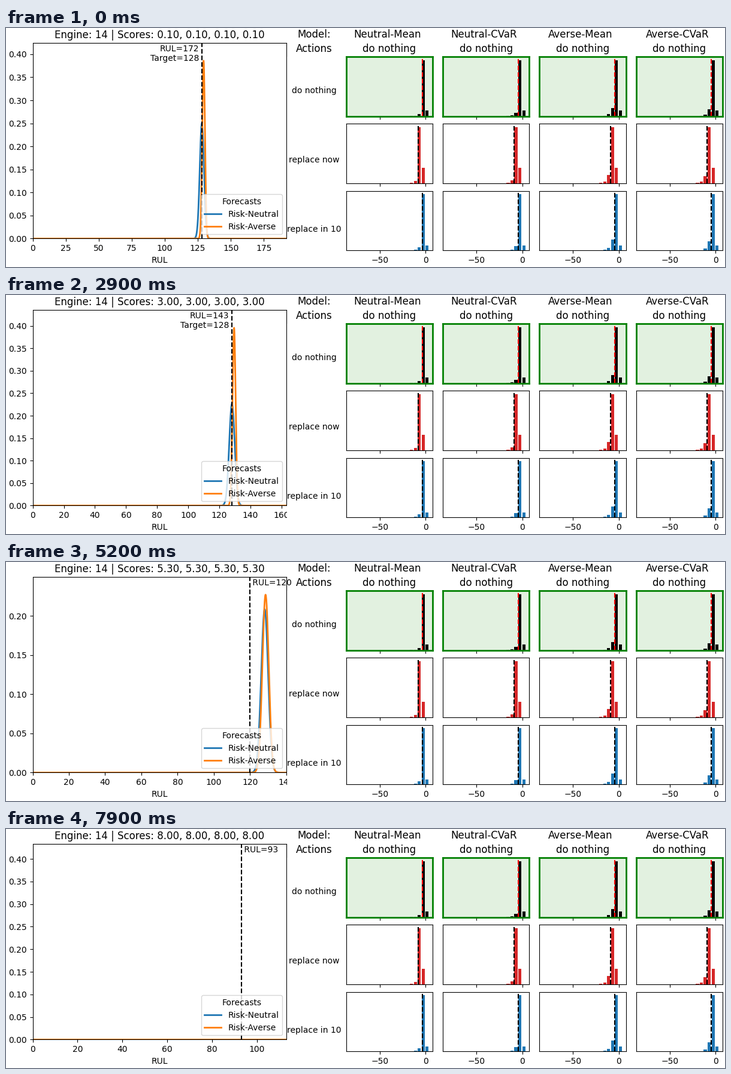
These frames come from a looping animation (1200x400 px, 8000 ms). A matplotlib script:

```python
import numpy as np
import matplotlib.pyplot as plt
from matplotlib.animation import FuncAnimation

W, H, DPI = 1200, 400, 100
FRAMES, INTERVAL = 80, 100
START_RUL, MAX_TARGET = 172, 128

plt.rcParams.update({"font.family": "DejaVu Sans", "font.size": 10})
fig = plt.figure(figsize=(W / DPI, H / DPI), dpi=DPI, facecolor="white")


def add_axes(left, top, right, bottom):
    """Add axes placed in pixels, measured from the top left corner."""
    return fig.add_axes([left / W, 1 - bottom / H,
                         (right - left) / W, (bottom - top) / H])


def heading(x, text, line):
    """Centre a heading on the first (0) or second (1) line above the panels."""
    fig.text(x / W, 1 - (16.5 + 23.5 * line) / H, text, fontsize=12,
             ha="center", va="baseline")


# Forecast panel
LEFT, RIGHT = 44.6, 467.7
main = add_axes(LEFT, 24.9, RIGHT, 352.4)
xs = np.linspace(0, 200, 2001)
neutral, = main.plot(xs, 0 * xs, color="tab:blue", lw=2, label="Risk-Neutral")
averse, = main.plot(xs, 0 * xs, color="tab:orange", lw=2, label="Risk-Averse")
target_line = main.axvline(MAX_TARGET, color="black", ls="--")
note = main.text(0, 0, "", va="top")
main.set_xlabel("RUL")
main.legend(title="Forecasts", loc="lower right")
title = main.set_title("")

# Histogram grid geometry, in pixels
GRID_LEFT, GRID_TOP = 567.7, 48
COL_PITCH, ROW_PITCH = 161.3, 112.4
PANEL_W, PANEL_H = 144.4, 99.6
ZERO = 132.5   # cost zero, from the panel's left edge
PX = 1.53      # pixels per unit of cost
STEP = 6.55    # bin width

# name, bar color, line color, height right of the mode, bins shifted, tail scale
ACTIONS = [
    ("do nothing", "black", "red", 10, 0, 1),
    ("replace now", "tab:red", "black", 26, 1, 1),
    ("replace in 10", "tab:blue", "black", 8.5, 0, 1.3),
]
# name, height left of the mode, pixels from zero to the expected cost
MODELS = [
    ("Neutral-Mean", 4, 5.6),
    ("Neutral-CVaR", 5.5, 7),
    ("Averse-Mean", 14, 7),
    ("Averse-CVaR", 12, 7.5),
]

names = add_axes(469, GRID_TOP, 559.5, H)
names.set(xlim=(469, 559.5), ylim=(H, GRID_TOP), xticks=[], yticks=[])
names.spines[:].set_visible(False)
heading(514.6, "Model:", 0)
heading(514.6, "Actions", 1)


def draw_histogram(left, top, action, model):
    _, color, line_color, head, shift, scale = action
    _, tail, expected = model
    ax = add_axes(left, top, left + PANEL_W, top + PANEL_H)
    heights = np.array([head, 94, *(scale * tail * 0.24 ** np.arange(3))])
    starts = -STEP * (np.arange(len(heights)) + shift) / PX
    ax.bar(starts, heights, width=0.8 * STEP / PX, align="edge", color=color)
    ax.axvline(-(expected + STEP * shift) / PX, color=line_color, ls="--")
    ax.set(xlim=(-ZERO / PX, (PANEL_W - ZERO) / PX), ylim=(0, PANEL_H),
           xticks=[-50, 0], yticks=[])
    return ax


for row, action in enumerate(ACTIONS):
    names.text(514.6, 104.6 + 116 * row, action[0],
               ha="center", va="center", clip_on=True)
    for col, model in enumerate(MODELS):
        left = GRID_LEFT + COL_PITCH * col
        ax = draw_histogram(left, GRID_TOP + ROW_PITCH * row, action, model)
        ax.tick_params(labelbottom=row == 2)
        if row == 0:
            # The chosen action
            ax.set_facecolor("#e2f1e0")
            ax.spines[:].set(color="green", linewidth=2)
            heading(left + PANEL_W / 2 - 3.5, model[0], 0)
            heading(left + PANEL_W / 2, action[0], 1)

# Step and peak density of the risk-averse forecast
AVERSE_KEYS = [(0, .386), (16, .256), (29, .396), (43, .308),
               (52, .227), (68, .18), (79, .394)]


def bell(mean, peak):
    """Normal density with the given mean and peak height."""
    return peak * np.exp(-np.pi * (peak * (xs - mean)) ** 2)


def update(i):
    rul = START_RUL - i
    target = min(rul, MAX_TARGET)
    n_peak = 0.25 - 0.0008 * i
    a_peak = np.interp(i, *zip(*AVERSE_KEYS))
    neutral.set_ydata(bell(128.1, n_peak))
    # A sharper forecast sits further right
    averse.set_ydata(bell(127.4 + 5.2 * a_peak, a_peak))

    x_max, y_max = rul + 20, 1.1 * max(n_peak, a_peak)
    main.set(xlim=(0, x_max), ylim=(0, y_max))
    target_line.set_xdata([target, target])

    if rul > MAX_TARGET:
        gap = 4.4 * x_max / (RIGHT - LEFT)
        note.set(text=f"RUL={rul}\nTarget={target}", ha="right")
        note.set_position((target - gap, 0.99 * y_max))
    else:
        note.set(text=f" RUL={rul}", ha="left")
        note.set_position((target, 0.99 * y_max))

    score = f"{(i + 1) / 10:.2f}"
    title.set_text("Engine: 14 | Scores: " + ", ".join([score] * 4))
    return neutral, averse, target_line, note, title


anim = FuncAnimation(fig, update, frames=FRAMES, interval=INTERVAL,
                     repeat=True, repeat_delay=0, blit=False)
plt.show()
```
